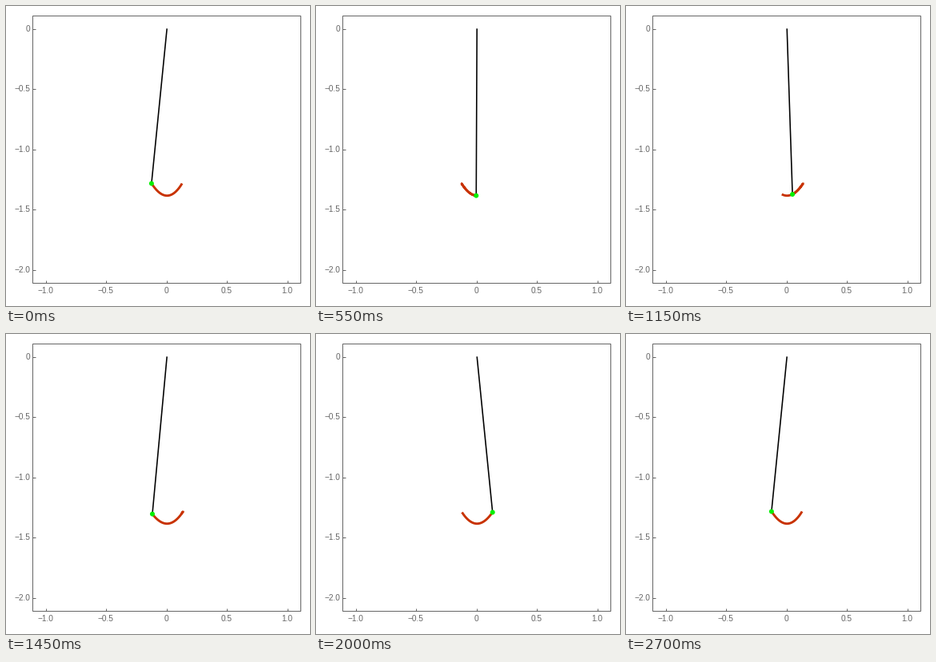
Animation of 380x376 px, one loop 3 s. Source, as a matplotlib script:

```python
import numpy as np
import matplotlib.pyplot as plt
from matplotlib.animation import FuncAnimation
from matplotlib.patches import Circle, Rectangle

W, H, DPI = 380, 376, 100
PX = 72 / DPI               # points per pixel
FRAMES, STEP_MS, HOLD = 60, 50, 5

PIVOT = (201.2, 28.3)
UNIT = 151                  # pixels per plot unit
OMEGA = np.pi / 13.2        # swing, radians per step
PHASE = 0.09
TRAIL_STEPS = 13.2
GREY = "#666666"

fig = plt.figure(figsize=(W / DPI, H / DPI), dpi=DPI, facecolor="white")
ax = fig.add_axes([0, 0, 1, 1])
ax.set_xlim(0, W)
ax.set_ylim(H, 0)
ax.axis("off")


def bob(n):
    """Position of the springy pendulum's bob at step n, in pixels."""
    a = OMEGA * n + PHASE
    reach = 19.5 + 0.05 * n
    return 201.3 - reach * np.cos(a), 230 - 7.7 * np.cos(2 * a)


def tick_line(xs, ys):
    ax.plot(xs, ys, color=GREY, lw=PX, solid_capstyle="butt", snap=True)


def label(x, y, value, ha):
    text = "0" if value == 0 else f"{value:.1f}".replace("-", "\u2212")
    ax.text(x, y, text, ha=ha, va="center_baseline", color=GREY,
            family="Liberation Sans", size=10.1 * PX)


def draw_frame():
    ax.add_patch(Rectangle((33, 12), 335, 335, fill=False, ec=GREY,
                           lw=PX, snap=True))
    for value in np.arange(-2, 3) / 2:
        x = round(201 + UNIT * value - 0.1)
        tick_line([x, x], [347, 344])
        label(x - 0.3, 356.4, value, "center")
    for value in np.arange(-4, 1) / 2:
        y = round(29 - UNIT * value - 0.1)
        tick_line([33, 36.5], [y, y])
        label(30.5, y - 0.6, value, "right")


draw_frame()
trail, = ax.plot([], [], color="#c83200", lw=2.9 * PX, zorder=3,
                 solid_capstyle="butt", solid_joinstyle="bevel")
rod, = ax.plot([], [], color="black", lw=1.6 * PX, zorder=4,
               solid_capstyle="butt")
dot = ax.add_patch(Circle((0, 0), 3, fc="#00f000", ec="none", zorder=5))


def update(i):
    # Hold, swing forward, then run the same motion backward.
    n = max(0, min(i, FRAMES - 1 - i) - HOLD)
    x, y = bob(n)
    trail.set_data(*bob(np.linspace(n - TRAIL_STEPS, n, 120)))
    rod.set_data([PIVOT[0], x], [PIVOT[1], y])
    dot.center = (x, y)
    return trail, rod, dot


anim = FuncAnimation(fig, update, frames=FRAMES, interval=STEP_MS,
                     repeat=True, repeat_delay=0)
plt.show()
```
